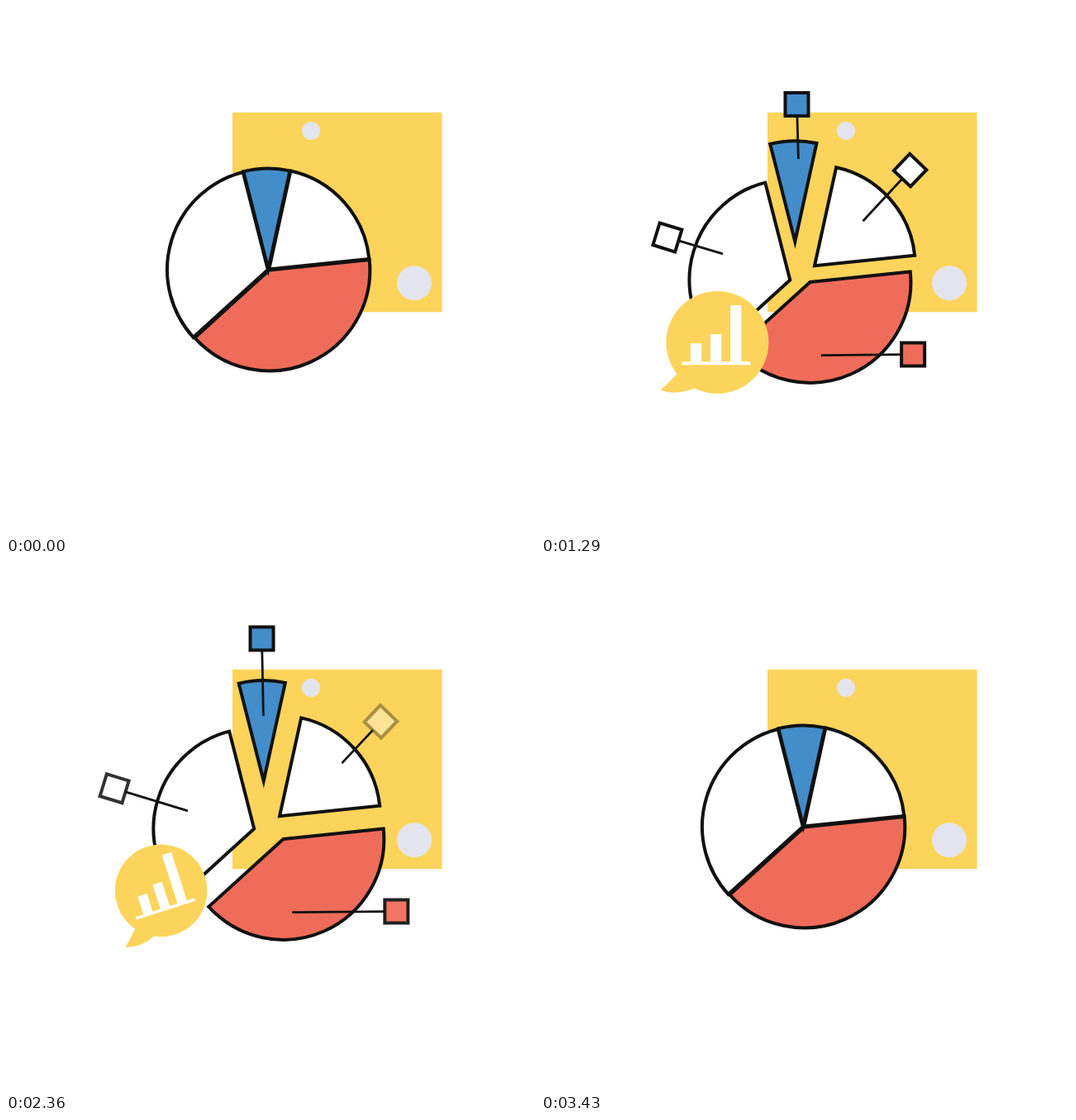
These frames come from a looping animation (640 by 640 pixels, 3570 ms). An HTML page:

```html
<!DOCTYPE html>
<html lang="en">
<head>
<meta charset="utf-8">
<title>Pie chart</title>
<style>
  html, body { margin: 0; width: 100%; height: 100%; overflow: hidden; background: #fff; }
  svg { display: block; width: 100vw; height: 100vh; }
</style>
</head>
<body>
<svg id="stage" viewBox="0 0 640 640">
  <path d="M274 128.7H527.5V370.2H274Z" fill="#fcd45c"/>
  <g fill="#e4e4ee"><circle cx="369" cy="151" r="11"/><circle cx="494" cy="335.2" r="21"/></g>
  <g id="slices" stroke="#111" stroke-width="4" stroke-miterlimit="10"></g>
  <g id="callouts" stroke="#111"></g>
  <g id="bubble" fill="#fcd45c">
    <circle cx="213.4" cy="407" r="62"/>
    <path d="M165 445L144.6 465Q165 471.5 186.5 462L200 440Z"/>
    <g id="bars" fill="#fff"><path d="M170 430.2H253.3V434.2H170Z"/></g>
  </g>
</svg>
<script>
const LOOP = 3570, FPS = 14, RADIUS = 121.8;
const RED = '#f06c5a', BLUE = '#438dca', WHITE = '#fff';
const $ = id => document.getElementById(id);

function add(parent, tag, attrs) {
  const node = document.createElementNS('http://www.w3.org/2000/svg', tag);
  for (const key in attrs) node.setAttribute(key, attrs[key]);
  return parent.appendChild(node);
}

const clamp = v => Math.min(1, Math.max(0, v));
const span = (t, start, length) => clamp((t - start) / length);
const smooth = u => u * u * (3 - 2 * u);
const easeOut = u => 1 - (1 - u) ** 3;
const mix = (a, b, u) => a + (b - a) * u;
const mixPoint = (a, b, u) => [mix(a[0], b[0], u), mix(a[1], b[1], u)];

// Monotone cubic curve through [time, value] pairs.
function track(keys) {
  const last = keys.length - 1;
  const slope = i => (keys[i + 1][1] - keys[i][1]) / (keys[i + 1][0] - keys[i][0]);
  const tangent = i => {
    if (i === 0) return slope(0);
    if (i === last) return 0;
    const a = slope(i - 1), b = slope(i);
    return a * b <= 0 ? 0 : 2 * a * b / (a + b);
  };
  return t => {
    if (t <= keys[0][0]) return keys[0][1];
    if (t >= keys[last][0]) return keys[last][1];
    let i = 0;
    while (t > keys[i + 1][0]) i++;
    const [t0, v0] = keys[i], [t1, v1] = keys[i + 1];
    const d = t1 - t0, u = (t - t0) / d;
    return mix(v0, v1, smooth(u))
      + d * u * (1 - u) * ((1 - u) * tangent(i) - u * tangent(i + 1));
  };
}

// Slices: angles clockwise from the top, apex at rest, then four open positions.
const slices = [
  { from: 227.8, to: 345.7, fill: WHITE, home: [316.8, 319],
    open: [[302.7, 330.3], [301.3, 331.6], [301.2, 330.3], [300.2, 321.6]] },
  { from: 12.4, to: 84.1, fill: WHITE, home: [318.2, 318.5],
    open: [[330, 314.6], [331, 314.2], [331, 313.1], [331, 306.3]] },
  { from: 84.1, to: 227.8, fill: RED, home: [318.5, 319.6],
    open: [[325, 332.8], [325.6, 334], [327, 334], [335.5, 334]] },
  { from: -14.3, to: 12.4, fill: BLUE, home: [317.3, 318.3],
    open: [[308.2, 288], [307.3, 285], [308, 282], [311.7, 263.8]] }
].map(slice => {
  const rim = deg => {
    const a = deg * Math.PI / 180;
    return `${RADIUS * Math.sin(a)} ${-RADIUS * Math.cos(a)}`;
  };
  const { home, open: [a, b, c, d] } = slice;
  const path = [
    [0, home], [143, mixPoint(home, a, .32)], [286, mixPoint(home, a, .65)],
    [571, mixPoint(home, a, .94)], [714, a], [1286, b], [1786, c], [2357, d],
    [2857, mixPoint(d, home, .8)], [2929, mixPoint(d, home, .87)],
    [3180, mixPoint(d, home, .975)], [3428, home]
  ];
  return {
    node: add($('slices'), 'path', {
      d: `M0 0L${rim(slice.from)}A${RADIUS} ${RADIUS} 0 0 1 ${rim(slice.to)}Z`,
      fill: slice.fill
    }),
    x: track(path.map(([t, p]) => [t, p[0]])),
    y: track(path.map(([t, p]) => [t, p[1]]))
  };
});

// Callouts: a square gliding outwards, tied to a line.
const glide = track([[714, 0], [1143, .59], [1286, .683], [1786, .875], [2357, .974], [2860, 1]]);
const callouts = [
  { base: [220, 299.8], from: [204, 296.5], to: [129.2, 272.2], turn: 17,
    fill: WHITE, fade: 2320, trim: 2400, trimTime: 500 },
  { base: [389.5, 260.2], from: [430.5, 214.5], to: [454, 191.3], turn: 43.7,
    fill: WHITE, fade: 2188, trim: 2190, trimTime: 450 },
  { base: [339, 422.6], from: [398, 421.5], to: [474.3, 421.5], turn: 0,
    fill: RED, fade: 2340, trim: 2290, trimTime: 450, grow: 680 },
  { base: [311.4, 185], from: [309.5, 183.5], to: [309.5, 89], turn: 0,
    fill: BLUE, fade: 2370, trim: 2400, trimTime: 500 }
];
for (const c of callouts) {
  c.square = add($('callouts'), 'rect',
    { x: -14, y: -14, width: 28, height: 28, fill: c.fill, 'stroke-width': 4 });
  c.line = add($('callouts'), 'line', { 'stroke-width': 2.8 });
}

function drawCallout(c, t) {
  const [x, y] = mixPoint(c.from, c.to, glide(t));
  c.square.setAttribute('transform', `translate(${x} ${y}) rotate(${c.turn})`);
  c.square.setAttribute('opacity', t < 700 ? 0 : 1 - span(t, c.fade, 260));

  const [bx, by] = c.base;
  const distance = Math.hypot(x - bx, y - by);
  const growth = c.grow ? mix(.1, 1, easeOut(span(t, c.grow, 600))) : 1;
  const reach = Math.max(2.5, (distance - 14) * growth);
  const cut = smooth(span(t, c.trim, c.trimTime));
  const start = mixPoint(c.base, [x, y], reach * cut / distance);
  const end = mixPoint(c.base, [x, y], reach / distance);
  c.line.setAttribute('x1', start[0]);
  c.line.setAttribute('y1', start[1]);
  c.line.setAttribute('x2', end[0]);
  c.line.setAttribute('y2', end[1]);
  c.line.setAttribute('visibility', t < 700 || cut >= 1 ? 'hidden' : 'visible');
}

// Speech bubble swings and scales around the tip of its tail.
const bubbleScale = track([[143, 0], [429, .9], [571, .99], [714, 1], [2150, 1], [2357, .9], [2640, 0]]);
const bubbleTurn = track([[143, -28], [429, -18], [571, -4], [714, -.7], [1000, 0], [2070, 0], [2357, -17.8], [2640, -28]]);
const bars = [
  { x: 181, height: 26.5, grow: track([[700, 0], [1286, .88], [1786, 1]]) },
  { x: 205, height: 35.5, grow: track([[643, 0], [714, .06], [1286, .97], [1786, 1]]) },
  { x: 229.2, height: 69.5, grow: track([[500, 0], [714, .71], [1000, 1]]) }
];
for (const bar of bars) bar.node = add($('bars'), 'rect', { x: bar.x, width: 13.2 });

function drawBubble(t) {
  $('bubble').setAttribute('transform',
    `translate(144.6 465) rotate(${bubbleTurn(t)}) scale(${bubbleScale(t)}) translate(-144.6 -465)`);
  for (const bar of bars) {
    const height = bar.height * bar.grow(t);
    bar.node.setAttribute('y', 431.5 - height);
    bar.node.setAttribute('height', height);
  }
}

function draw(t) {
  for (const s of slices) s.node.setAttribute('transform', `translate(${s.x(t)} ${s.y(t)})`);
  for (const c of callouts) drawCallout(c, t);
  drawBubble(t);
}

const began = performance.now();
function tick() {
  const elapsed = (performance.now() - began) % LOOP;
  const step = Math.min(48, Math.floor((elapsed + 5) * FPS / 1000));
  draw(step * 1000 / FPS);
  requestAnimationFrame(tick);
}
tick();
</script>
</body>
</html>
```
